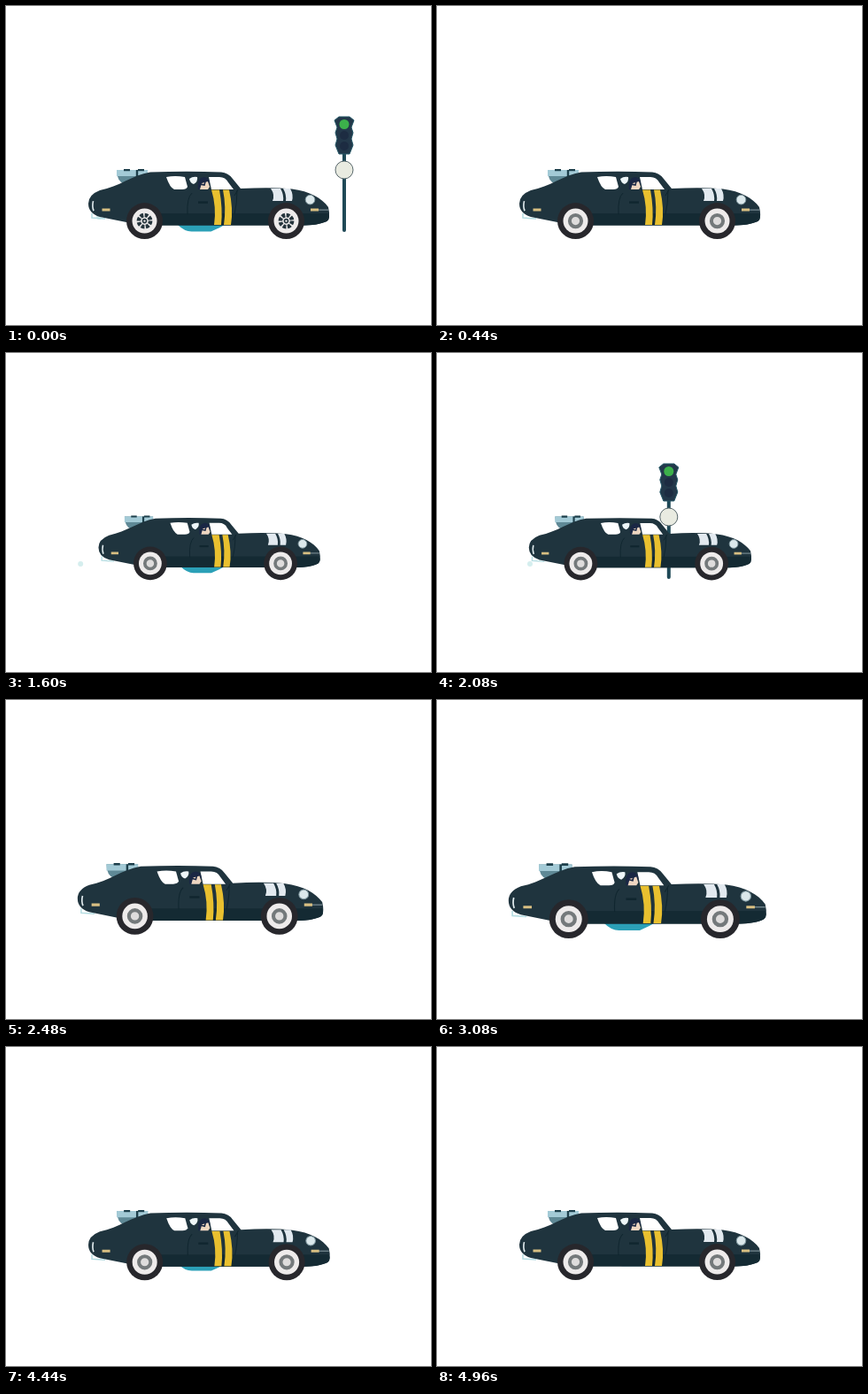
An HTML page for the animation above (5 s loop, 480 px wide and 360 px high).

```html
<!DOCTYPE html>
<html lang="en">
<head>
<meta charset="utf-8">
<title>Racing car</title>
<style>
  html, body { margin: 0; height: 100%; overflow: hidden; background: #fff; }
  svg { display: block; width: 480px; height: 360px; }
</style>
</head>
<body>
<svg viewBox="0 0 480 360">
  <defs>
    <clipPath id="road"><rect x="86" width="308" height="360"/></clipPath>
    <g id="tyre">
      <circle r="20.500" fill="#27272c"/>
      <circle r="14" fill="#eeebeb"/>
    </g>
    <g id="spokes" fill="none" stroke="#25343c">
      <circle r="6.6" stroke-width="4.6" stroke-dasharray="3.7 1.48"/>
      <circle r="2" stroke-width="1.6"/>
    </g>
    <circle id="blur" r="6.6" fill="#dedcdc" stroke="#74797b" stroke-width="4"/>
  </defs>

  <g clip-path="url(#road)">
    <g id="signal">
      <path d="M0 166V253" stroke="#1f4957" stroke-width="4" stroke-linecap="round"/>
      <path d="M-6 125H6L11 129L8 137L10 143L8 150L10 157L6 167H-6L-10 157L-8 150L-10 143L-8 137L-11 129Z"
            fill="#23384a" stroke="#245766"/>
      <circle cy="133.5" r="5.5" fill="#3cb14b"/>
      <g fill="#1d2c42"><circle cy="146" r="5"/><circle cy="158" r="5"/></g>
      <circle cy="185" r="10" fill="#e9ebe1" stroke="#59686c"/>
    </g>
  </g>

  <circle id="puff" r="3" fill="#d5eeee"/>

  <g id="car">
    <path id="under" d="M190 240L194 247Q202 255 210 255H232Q242 251 250 246V240Z" fill="#2ba0b7"/>

    <g transform="translate(.5 1.5)">
      <!-- rear luggage -->
      <path d="M125 184H160V200H134Q125 197 125 184Z" fill="#5f8996"/>
      <path d="M125 184H160V191H125Z" fill="#a3cad6"/>
      <path d="M133 184h7M149 184h7M148 184v12" stroke="#1d3f4b" stroke-width="2.4"/>
      <path d="M97 233V238L112 239" fill="none" stroke="#b5dde2" stroke-width="1.5"/>

      <path d="M93 222Q93 212 106 207C128 203 142 190 163 186.500Q205 185 243 186.500Q251 187 256 194L265 205
               Q300 203 323 205.500C343 208 357 216 364 226Q367 239 362 242Q353 246 338 246.500H175
               Q150 247 136 243L106 237Q93 233 93 222Z" fill="#1f343e"/>
      <path d="M174 233H364Q367 241 360 243Q350 246.500 338 246.500H174Z" fill="#142a33"/>
      <g fill="none" stroke="#10262f">
        <path d="M262 206L258 213M210 210Q204 215 205 234M261 207Q261 222 258 234"/>
        <path d="M217 220.500h11" stroke-width="2.4"/>
      </g>

      <!-- cabin -->
      <path d="M181 192Q191 190 202 192L205 203Q204 206 199 206H190Q185 204 181 192Z" fill="#fff"/>
      <path d="M207 194Q211 191 216 192Q217 197 212 200Q208 199 207 194Z" fill="#eef6f8"/>
      <path d="M229 192H241Q248 192 251 198L257 206H232Z" fill="#fff"/>
      <path d="M217 206Q215 193 224 192Q230 193 230 199L227 206Z" fill="#1a2744"/>
      <path d="M221 199L228 197L230 203L228 206H219Z" fill="#eed6c1"/>
      <path d="M220 200l4 1l1-4" fill="none" stroke="#1a2744" stroke-width="1.6"/>

      <g fill="#e9c02f">
        <path d="M232 206.500H241Q245 228 243 246H235Q238 226 232 206.500Z"/>
        <path d="M245 206.500H252Q257 228 254 246H246Q249 226 245 206.500Z"/>
      </g>
      <g fill="#e2e9ef">
        <path d="M299 205H310Q314 212 313 219H301Q304 212 299 205Z"/>
        <path d="M313 205H321Q325 212 323 219H316Q317 212 313 205Z"/>
      </g>

      <circle cx="343.500" cy="217.500" r="5.300" fill="#dbe8eb" stroke="#7f979f"/>
      <path d="M350 229H364" stroke="#a9bbc0" stroke-width=".8"/>
      <path d="M108.500 229h9M344 229h9" stroke="#d8bf82" stroke-width="3"/>
      <path d="M98.500 219Q97 225 99 230" fill="none" stroke="#e2ecef" stroke-width="1.6"/>
    </g>

    <g transform="translate(157 243)"><use href="#tyre"/><use class="hub"/></g>
    <g transform="translate(317 243)"><use href="#tyre"/><use class="hub"/></g>
  </g>
</svg>
<script>
const LOOP = 5000, STEP = 40;
const byId = id => document.getElementById(id);
const hubs = document.querySelectorAll('.hub');

const bump = (time, centre, width) => Math.exp(-(((time - centre) / width) ** 2));
const move = (id, x, y) => byId(id).setAttribute('transform', `translate(${x} ${y})`);

// The car falls back and shrinks, then drops behind and surges ahead
function drawCar(time) {
  const scale = 1 - .115 * bump(time, 1850, 420) + .07 * bump(time, 3120, 720);
  const x = 236.5 - 16 * bump(time, 2700, 300) + 11.5 * bump(time, 3700, 400);
  const y = 242.6 + 65 * (scale - 1);
  byId('car').setAttribute('transform',
    `translate(${x} ${y}) scale(${scale}) translate(-237 -243)`);

  const depth = 9 * Math.max(0, Math.cos(2 * Math.PI * time / 1540));
  move('under', 0, depth - 9);
  const hub = time < STEP ? '#spokes' : '#blur';
  hubs.forEach(use => use.setAttribute('href', hub));
}

// Signals flash past at gradually shorter intervals
function drawSignal(time) {
  const interval = 793, power = .85;
  const count = Math.floor((time / interval) ** (1 / power));
  move('signal', 382 - 1.925 * (time - interval * count ** power), 0);
}

function drawPuff(time) {
  move('puff', 105 - time % 520 * .52, 238);
  byId('puff').style.display = time < 2240 ? '' : 'none';
}

const began = performance.now();
function tick() {
  // A short lead absorbs timer jitter at the 40 ms steps
  const elapsed = performance.now() - began + 4;
  const time = Math.floor(elapsed / STEP) * STEP % LOOP;
  drawCar(time);
  drawSignal(time);
  drawPuff(time);
  requestAnimationFrame(tick);
}
tick();
</script>
</body>
</html>
```
